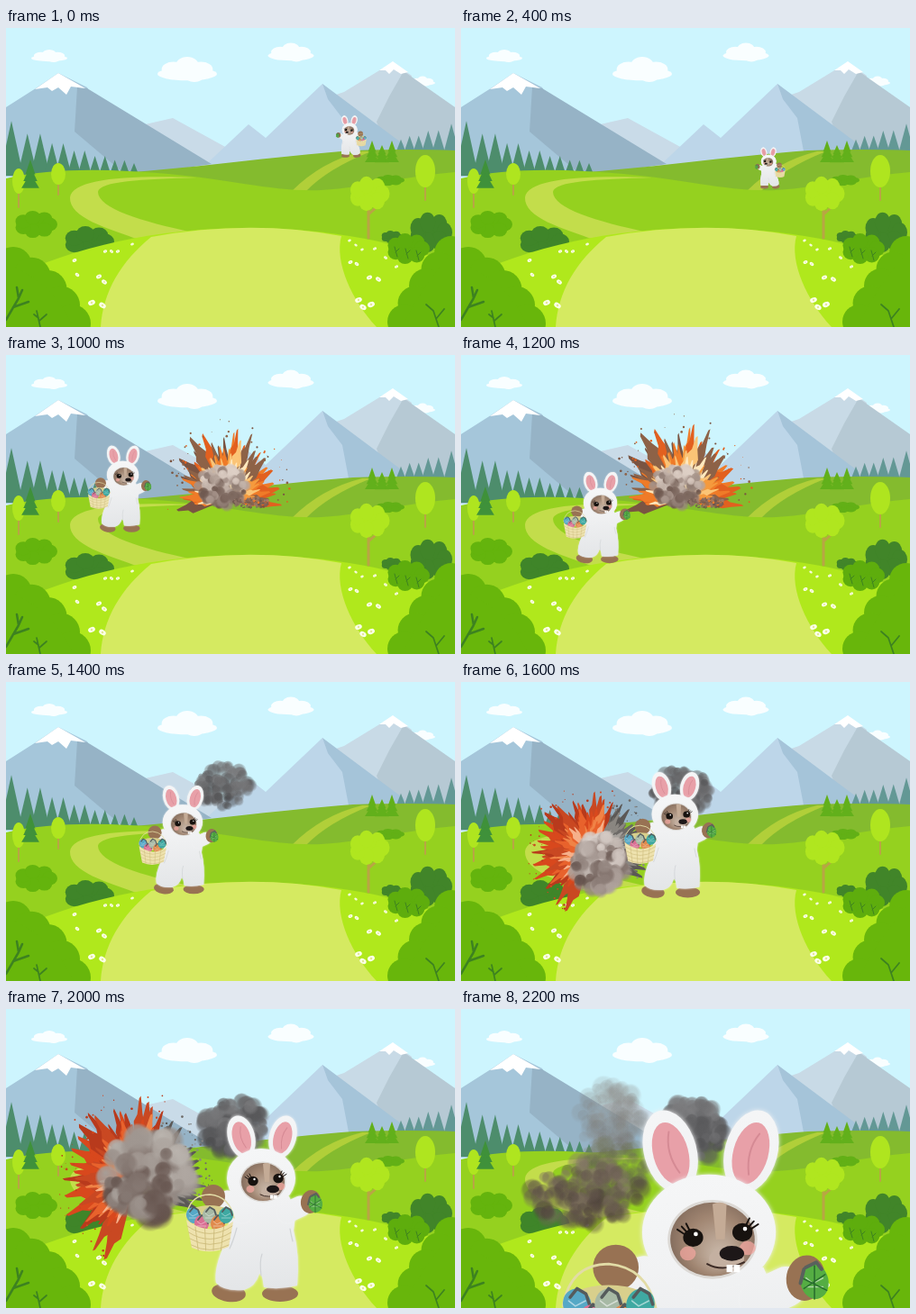
Write an HTML page with a canvas that moves like this. It is 498 by 332 pixels and loops after 2.4 s.

```html
<!DOCTYPE html>
<html>
<head>
<meta charset="utf-8">
<style>
html, body { margin: 0; width: 498px; height: 332px; overflow: hidden; }
canvas { display: block; }
</style>
</head>
<body>
<canvas id="stage" width="498" height="332"></canvas>
<script>
const c = document.getElementById('stage').getContext('2d');
const TAU = Math.PI * 2;
let seed = 1;
const rnd = () => (seed = seed * 16807 % 2147483647) / 2147483647;
const mix = (a, b, t) => a + (b - a) * t;
const pick = list => list[Math.floor(rnd() * list.length)];

function shape(color, d) {
  c.fillStyle = color;
  c.fill(new Path2D(d));
}
function line(color, width, d) {
  c.strokeStyle = color;
  c.lineWidth = width;
  c.lineCap = c.lineJoin = 'round';
  c.stroke(new Path2D(d));
}
function oval(color, x, y, rx, ry = rx, turn = 0) {
  c.fillStyle = color;
  c.beginPath();
  c.ellipse(x, y, rx, ry, turn, 0, TAU);
  c.fill();
}

function cloud(x, y, w, h) {
  oval('#f9feff', x, y + h * .18, w * .5, h * .26);
  for (let i = -1; i <= 1; i++) {
    oval('#f9feff', x + w * i * .23, y - h * (i ? 0 : .12), w * .2, h * (i ? .3 : .38));
  }
  oval('#f9feff', x + w * .12, y + h * .26, w * .16, h * .24);
}
// Tree tops shrink from x0 towards x1
function forest(color, x0, x1, base, height, decay, n) {
  for (let i = 0; i < n; i++) {
    const x = mix(x0, x1, (i / (n - 1)) ** .85);
    const h = height * decay ** i * (i % 2 ? .9 : 1.03), w = 4 + h * .16;
    shape(color, `M${x} ${base - h}L${x + w} ${base + 3}H${x - w}Z`);
  }
}
function fir(color, x, top, base, w) {
  const h = base - top;
  for (let i = 0; i < 3; i++) {
    const r = w * (.55 + i * .22), y = top + h * i * .23;
    shape(color, `M${x} ${y}L${x + r} ${y + h * .5}H${x - r}Z`);
  }
}
function roundTree(x, y, rx, ry, foot) {
  line('#b9a544', 2, `M${x} ${y}V${foot}`);
  oval('#afe51f', x, y, rx, ry);
}
function shrub(color, x, y, w, h) {
  oval(color, x, y, w * .4, h * .4);
  for (let i = 0; i < 7; i++) {
    const a = i / 7 * TAU - .9;
    oval(color, x + Math.cos(a) * w * .32, y + Math.sin(a) * h * .26, w * .18, h * .25);
  }
}
// Scalloped bush that fills a bottom corner
function cornerBush(corner, x0, y0, x1, y1, r, bulge) {
  const color = '#68b60b', out = Math.sign(x1 - x0);
  let d = `M${corner} 332L${corner} ${y0}`;
  for (let i = 0; i < 5; i++) {
    const t = i / 4, b = Math.sin(t * Math.PI) * bulge;
    const x = mix(x0, x1, t) + b * out, y = mix(y0, y1, t) - b;
    oval(color, x, y, r);
    d += `L${x} ${y}`;
  }
  shape(color, d + 'V332Z');
}
function flowers(x, y, n, gap, slope = 0) {
  const r = 1.6 + (y - 236) / 36;
  for (let i = 0; i < n; i++) {
    const px = x + i * gap, py = y + i * slope, turn = i % 2 - .4;
    oval('#fbffe9', px, py, r * 1.15, r * .8, turn);
    oval('#e4e79a', px, py, r * .35);
  }
}

function scenery() {
  c.fillStyle = '#cdf5fe';
  c.fillRect(0, 0, 498, 332);
  cloud(48, 31, 40, 14);
  cloud(201, 46, 66, 28);
  cloud(316, 27, 51, 21);
  cloud(462, 59, 28, 11);

  shape('#c9dbe8', 'M150 108L185 100 245 133 220 155Z');
  shape('#c8dae6', 'M360 76L375 71 429 38 450 53 440 140Z');
  shape('#b6c9d4', 'M441 48L498 88V140H425L411 104 425 76Z');
  shape('#fff', 'M414 47L429 37 446 49 438 51 430 46 425 51 421 47Z');
  shape('#bdd6e9', 'M215 158L269 107 288 122 351 62 440 142Z');
  shape('#a5c4d9', 'M351 62L442 130 436 142H381L373 100 357 79Z');
  shape('#a5c6da', 'M0 88L33 67 58 50 90 66 150 165H0Z');
  shape('#96b3c6', 'M79 66L90 67 228 151 135 165 76 115Z');
  shape('#fff', 'M32 68L58 50 88 67 72 65 67 74 58 66 51 70 46 66Z');

  forest('#4d8d6c', 6, 142, 161, 56, .87, 12);
  forest('#639895', 494, 438, 136, 29, .86, 6);

  shape('#84bb2e', 'M100 163C200 157 300 142 385 136Q450 134 498 136V210H100Z');
  shape('#b1cf39', 'M317 181Q350 148 395 137L405 137Q357 156 333 181Z');
  shape('#95d11f', 'M0 167C50 155 115 156 180 162C250 168 295 182 350 180C400 177 445 164 498 160V332H0Z');
  shape('#c3dd4b', 'M212 166C130 163 74 168 71 188C70 211 112 222 150 236L208 227C150 215 102 200 102 182C104 170 150 168 212 166Z');

  roundTree(14, 170, 7, 14, 199);
  fir('#3f913a', 27, 146, 179, 10);
  roundTree(58, 162, 8, 12, 185);
  roundTree(465, 159, 11, 18, 191);
  for (let i = 0; i < 3; i++) fir('#62b01b', 406 + i * 11, 125 + i % 2 * 5, 150, 8);
  shrub('#62b016', 426, 169, 32, 12);
  shrub('#64b40d', 33, 218, 48, 30);
  shrub('#3f8529', 92, 237, 56, 34);
  shrub('#418529', 471, 227, 48, 44);
  shrub('#418529', 428, 232, 24, 14);

  shape('#b0e81c', 'M0 280C75 242 170 222 270 222C355 222 440 238 498 264V332H0Z');
  shape('#d5ea61', 'M105 332C108 292 127 260 161 232Q270 212 372 231C364 260 384 303 411 332Z');
  line('#b9a544', 3, 'M402 195V233M402 207L411 199');
  shrub('#b0e61f', 403, 184, 45, 38);

  flowers(110, 248, 3, 7);
  flowers(140, 240, 1, 0);
  flowers(76, 258, 2, 3, 16);
  flowers(103, 276, 2, 6, 6);
  flowers(95, 305, 2, 12, 3);
  flowers(381, 236, 3, 7, 5);
  flowers(409, 245, 3, 12, 10);
  flowers(382, 260, 2, 7, 2);
  flowers(403, 277, 2, 10, 2);
  flowers(391, 302, 2, 5, 8);
  flowers(405, 307, 1, 0);

  shrub('#5ead0d', 446, 245, 48, 34);
  for (let i = 0; i < 3; i++) {
    const x = 434 + i * 12, y = 254 + i * 2;
    line('#3d8220', 1, `M${x} ${y}l-3 -11m1 6l4 -4`);
  }
  cornerBush(0, 8, 264, 73, 328, 21, 6);
  cornerBush(498, 494, 250, 442, 326, 19, 2);
  line('#3d8220', 2.5, 'M0 324L14 300 12 288M8 310L25 304M14 300L18 291');
  line('#3d8220', 1.7, 'M38 332L34 314M37 325L45 318M36 322L31 318M480 332L474 314 466 307M477 323L486 312');
}

// Puffs lit from above; light and dark are r,g,b lists
function smoke(x, y, rx, ry, light, dark, alpha = 1) {
  seed = 7 + Math.round(x * 31 + y * 17);
  for (let i = 0; i < 120; i++) {
    const a = rnd() * TAU, d = Math.sqrt(rnd()) * .85;
    const px = x + Math.cos(a) * d * rx, py = y + Math.sin(a) * d * ry;
    const r = Math.min(rx, ry) * (.13 + rnd() * .2);
    const k = Math.min(1, Math.max(0, .5 + (py - y) / ry * .35 + (rnd() - .5) * .9));
    const rgb = light.map((v, j) => Math.round(mix(v, dark[j], k))).join();
    const g = c.createRadialGradient(px - r * .2, py - r * .4, 0, px, py, r);
    g.addColorStop(0, `rgba(${rgb},${alpha})`);
    g.addColorStop(.7, `rgba(${rgb},${alpha * .8})`);
    g.addColorStop(1, `rgba(${rgb},0)`);
    oval(g, px, py, r);
  }
}
// Jagged layers of debris over the angles a0..a1, brighter towards the middle
function debris(x, y, rx, ry, a0, a1, colors, start) {
  seed = start;
  for (let layer = 0; layer < 3; layer++) {
    const reach = 1 - layer * .19;
    for (let i = 0; i < 26; i++) {
      const a = mix(a0, a1, (i + rnd()) / 26), l = reach * (.68 + .32 * rnd()), w = .09 + rnd() * .08;
      const at = (t, m) => `${x + Math.cos(t) * rx * m} ${y + Math.sin(t) * ry * m}`;
      const shade = colors[Math.min(colors.length - 1, Math.floor((rnd() * .5 + layer * .25) * colors.length))];
      shape(shade, `M${x} ${y}L${at(a - w, l * .7)} ${at(a - w * .4, l * .78)} ${at(a - w * .2, l * .97)} ${at(a, l)} ${at(a + w * .4, l * .8)} ${at(a + w, l * .66)}Z`);
    }
  }
  for (let i = 0; i < 45; i++) {
    const a = mix(a0, a1, rnd()), m = .75 + rnd() * .3;
    oval(pick(colors.slice(0, 3)), x + Math.cos(a) * rx * m, y + Math.sin(a) * ry * m, .4 + rnd());
  }
}

const FIRE = ['#7a5442', '#e2601f', '#8d6247', '#ef7b28', '#f59a3d', '#fbc476', '#ffe8bd'];
const EMBER = ['#b83a1c', '#d8481d', '#c94822', '#e8622c', '#f08346', '#f6b08a'];
const ASH = ['#5b5856', '#6d6a67', '#8a8681', '#a5a09b'];

// age counts steps since the bang: three of fire, then drifting smoke
function farBlast(age) {
  if (age < 3) {
    debris(246, 160, 60 + age * 8, 82 + age * 6, -3.3, .15, FIRE, 42);
    smoke(240, 146, 31, 25, [222, 208, 198], [108, 86, 77]);
    smoke(272, 164, 24, 7, [160, 130, 115], [98, 76, 68], .8);
  } else {
    smoke(229 + age * 4, 101 + age * 5, 34 + age, 18 + age * 3, [126, 126, 128], [72, 72, 74], .45 + age * .05);
  }
}
function nearBlast(age) {
  if (age < 3) {
    const t = age / 2;
    debris(150, 190, 62 + t * 14, 68 + t * 14, -1.25, .5, ASH, 23);
    debris(144, 190, 70 + t * 16, 72 + t * 26, 2, 5.15, EMBER, 91);
    smoke(154 + t * 4, 202 - t * 16, 34 + t * 20, 36 + t * 18, [216 - t * 30, 206 - t * 26, 200 - t * 26], [98, 80, 74]);
  } else {
    smoke(165, 122, 44, 44, [150, 152, 150], [120, 120, 118], .22);
    smoke(170, 180, 46, 36, [120, 120, 92], [84, 92, 60], .25);
    smoke(138, 205, 74, 42, [138, 122, 108], [76, 64, 57], .5);
  }
}

function egg(color, x, y, rx, ry, turn = 0) {
  oval(color, x, y, rx, ry, turn);
  line('#ffffff88', .8, `M${x - rx * .6} ${y - 2}L${x - 1} ${y + 1} ${x + rx * .6} ${y - 2}M${x - rx * .6} ${y + 3}H${x + rx * .6}`);
}
function basket() {
  line('#e2dca6', 1.4, 'M-84 42Q-80 18 -58 18Q-36 20 -31 44');
  oval('#d8cf8c', -58, 42, 26, 12);
  const paints = ['#56a8c6', '#d96f93', '#a7b9a5', '#e08a4c', '#3fa9a2'];
  paints.forEach((paint, i) => {
    const x = -76 + i * 9, y = i % 2 ? 50 : 41;
    egg(paint, x, y, 8, 9, (i - 2) * .15);
    line('#555b5c', 1.8, `M${x - 4} ${y - 4}l4 -5 5 3 2 6`);
  });
  shape('#eee2ae', 'M-84 46Q-58 66 -32 48L-37 76Q-58 86 -78 77Z');
  for (let i = 0; i < 4; i++) {
    const y = 53 + i * 7, x = -74 + i * 10.5;
    line('#c9b877', .8, `M${-83 + i * 1.5} ${y}Q-58 ${y + 17 - i * 2} ${-33 - i * 1.3} ${y}M${x} 54L${mix(x, -58, .2)} 80`);
  }
}
function ear(side, fur, blur) {
  c.save();
  c.translate(side * 23, -46);
  c.rotate(side * .26);
  c.shadowBlur = blur;
  oval(fur, 0, 0, 15, 24);
  c.shadowBlur = 0;
  oval('#e8a0a8', 0, 1, 10, 18);
  line('#d58a94', 1, 'M2 -11Q-3 0 2 13');
  c.restore();
}
function face() {
  const brown = c.createRadialGradient(6, 14, 2, 1, 3, 27);
  brown.addColorStop(0, '#c9b8a9');
  brown.addColorStop(.6, '#a08571');
  brown.addColorStop(1, '#7c6658');
  oval('#dcd9d5', 1, 4, 25.5, 22.5);
  oval(brown, 1, 4, 24, 21);
  shape('#c4ab96', 'M1 -16Q5 -18 9 -16L8 4H3Z');
  for (const [x, y, out] of [[-10, 3, -1], [18, 0, 1]]) {
    for (let i = 0; i < 3; i++) line('#17120f', 1, `M${x + out * (2 + i * 1.5)} ${y - 4 + i}l${out * (2 + i)} ${-4 + i * .7}`);
    oval('#f3a6a0bb', x + out * 3, y + 9, 4.5, 4);
    oval('#17120f', x, y, 5.7, 5.2);
    oval('#fff', x + 1.5, y - 2, 1.2);
  }
  oval('#c4b0a1', 9, 15, 10, 6);
  oval('#1d1718', 12, 12, 7, 4.3);
  line('#3b2a25', 1, 'M-2 18Q7 23 19 17');
  c.fillStyle = '#fff';
  c.fillRect(9, 18.5, 3.6, 4.2);
  c.fillRect(13, 18.5, 3.6, 4.2);
}
// The middle of the head is at 0,0
function bunny(x, y, size, flip) {
  c.save();
  c.translate(x, y);
  c.scale(size * flip, size);
  const blur = 3 * size;
  const fur = c.createLinearGradient(0, -60, 10, 120);
  fur.addColorStop(0, '#f7f8f9');
  fur.addColorStop(.45, '#f1f2f3');
  fur.addColorStop(1, '#e4e6e8');
  const paw = '#987253';
  c.shadowColor = '#f1f2f3';

  oval(paw, -37, 127, 19, 10, .15);
  oval(paw, 20, 128, 20, 9);
  c.shadowBlur = blur;
  shape(fur, 'M-26 20Q-37 40 -41 72Q-54 100 -51 116Q-42 126 -20 124Q-7 120 -3 106Q0 104 2 121Q20 124 39 119Q42 85 35 58Q39 38 30 20Z');
  line(fur, 23, 'M-22 38L-38 25M28 38L43 31');
  c.shadowBlur = 0;
  line('#d0d3d6', 1.2, 'M-1 108Q-3 92 0 84M-28 55Q-32 70 -36 78M31 56Q32 62 34 70');
  oval(paw, 54, 26, 11, 13, .2);
  oval(paw, -54, 20, 13, 13);

  ear(-1, fur, blur);
  ear(1, fur, blur);
  c.shadowBlur = blur;
  oval(fur, -1, 0, 38, 33);
  c.shadowBlur = 0;
  face();
  basket();

  egg('#55ad43', 59, 28, 8, 10, -.2);
  line('#286e2d', .8, 'M52 26L66 33M53 32L65 24M59 19V38');
  line('#59615d', 2, 'M54 20L60 17 63 21M53 21L51 29');
  c.restore();
}

// Waypoints along the road: step, x, y, size
const walk = [
  [0, 381, 113, .225], [2, 341, 148, .222], [4, 182, 112, .44], [5, 130, 133, .465],
  [6, 155, 164, .49], [8, 238, 147, .676], [10, 284, 188, 1], [11, 277, 248, 1.95]
];
function pose(step) {
  const i = Math.max(1, walk.findIndex(p => p[0] >= step));
  const [from, to] = [walk[i - 1], walk[i]];
  const t = (step - from[0]) / (to[0] - from[0]);
  return from.slice(1).map((v, j) => mix(v, to[j + 1], t));
}

let shown = -1;
function draw() {
  const step = Math.floor(performance.now() % 2400 / 200);
  if (step !== shown) {
    shown = step;
    scenery();
    if (step >= 4) farBlast(step - 4);
    if (step >= 8) nearBlast(step - 8);
    bunny(...pose(step), step < 4 ? -1 : 1);
  }
  requestAnimationFrame(draw);
}
draw();
</script>
</body>
</html>
```
